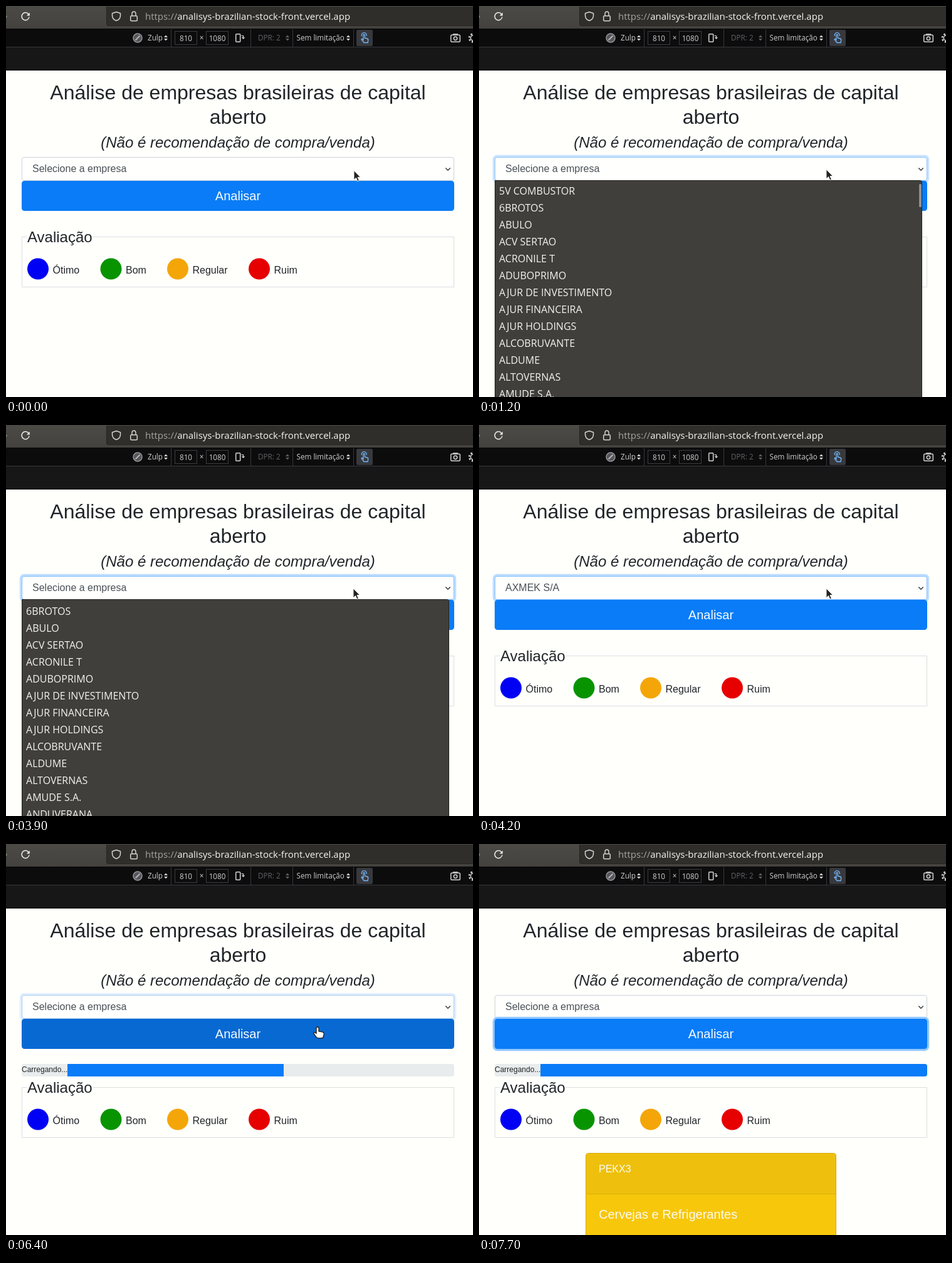
These frames come from a looping animation (745x624 px, 8 s). An HTML page:

```html
<!DOCTYPE html>
<html lang="pt">
<head>
<meta charset="utf-8">
<title>Análise de empresas</title>
<style>
html, body { margin: 0; width: 100%; height: 100%; overflow: hidden; background: #fffffc; }
svg { display: block; }
text { font-family: "Liberation Sans", Arial, sans-serif; fill: #212529; }
.ui { font-family: "Open Sans", "Noto Sans", sans-serif; }
.bar { font-size: 11.7px; fill: #cfcfd0; }
.dim { fill: #606064; }
.mid { text-anchor: middle; }
.line { fill: none; stroke: #d4d4d4; stroke-width: 1.5; }
.box { fill: none; stroke: #3c3c40; }
</style>
</head>
<body>
<svg width="745" height="624" viewBox="0 0 745 624">
  <defs>
    <linearGradient id="top" x1="0" y1="0" x2="0" y2="1">
      <stop offset="0" stop-color="#4b4a45"/><stop offset="1" stop-color="#43423e"/>
    </linearGradient>
    <clipPath id="listClip"><rect x="26" y="282" width="680" height="342"/></clipPath>
  </defs>

  <!-- browser chrome -->
  <rect width="745" height="37" fill="url(#top)"/>
  <path d="M160 1H745V32H164q-4 0-4-4z" fill="#2f2e2b"/>
  <path d="M160.500 1V28q0 3.500 3.500 3.500H745" fill="none" stroke="#252421"/>
  <path d="M0 14.500l2 2.500-2 2.500" fill="#85847f"/>
  <path d="M36 13.200A6 6 0 1 0 37 17.500" class="line" style="stroke:#eee"/>
  <path d="M37.800 10.500v5h-5z" fill="#eee"/>
  <path d="M176 9.500l6.500 2.200v3.500q0 6-6.500 8.300q-6.500-2.300-6.500-8.300v-3.500z" class="line" stroke-linejoin="round"/>
  <rect x="198.700" y="15.700" width="10.600" height="8" rx="1.500" class="line"/>
  <path d="M201 15.500v-3q0-3.500 3-3.500t3 3.500v3" class="line"/>
  <text class="ui" x="222" y="22" font-size="15" style="fill:#a5a4a0">https://<tspan fill="#f4f4f2">analisys-brazilian-stock-front.vercel.app</tspan></text>

  <!-- device toolbar -->
  <rect y="36" width="745" height="30" fill="#0c0c0d"/>
  <rect y="65" width="745" height="38" fill="#171718"/>
  <path d="M0 65.500H745M263.500 37V65M390.500 37V65M457.500 37V65M554.500 37V65" stroke="#38383d"/>
  <path d="M0 102.500H745" stroke="#101011"/>
  <circle cx="210" cy="51" r="7" fill="#55555a" stroke="#98989c" stroke-width="1.500"/>
  <path d="M206.500 54.500l7-7" stroke="#b5b5b8" stroke-width="2"/>
  <text class="ui bar" x="226" y="55">Zulp</text>
  <rect x="269.500" y="40.500" width="35" height="21" class="box"/>
  <rect x="319.500" y="40.500" width="35" height="21" class="box"/>
  <text class="ui bar mid" x="287" y="55.500">810</text>
  <text class="ui bar mid" x="312" y="55">×</text>
  <text class="ui bar mid" x="337" y="55.500">1080</text>
  <rect x="366.700" y="44.700" width="7" height="12.600" rx="1" class="line"/>
  <path d="M375.500 47.500h3v4M376.500 50l2 2.200 2-2.200" class="line" style="stroke-width:1.200"/>
  <text class="ui bar dim" x="402" y="55">DPR: 2</text>
  <text class="ui bar" x="463.500" y="55">Sem limitação</text>
  <g id="spin"></g>
  <rect x="559" y="38" width="26" height="26" rx="2" fill="#38393d"/>
  <path d="M570 54v-7q0-1.500 1.200-1.500t1.200 1.500v4l3.600 1q2 .6 1.700 2.500l-.6 4h-6l-4-5q0-1.500 1.500-1zM567.500 48a4 4 0 1 1 7.500 0" fill="none" stroke="#75b8fb" stroke-width="1.300"/>
  <rect x="709.700" y="46.200" width="14.600" height="11" rx="1.500" class="line"/>
  <path d="M713 45h8" class="line"/>
  <circle cx="717" cy="51.700" r="2.700" class="line"/>
  <circle cx="745.500" cy="51" r="4.200" class="line"/>
  <circle cx="745.500" cy="51" r="6.500" class="line" stroke-dasharray="2.500 2.600" style="stroke-width:2.500"/>

  <!-- page -->
  <text class="mid" x="370" y="149" font-size="32">Análise de empresas brasileiras de capital</text>
  <text class="mid" x="370" y="188" font-size="32">aberto</text>
  <text class="mid" x="370" y="226" font-size="24" font-style="italic">(Não é recomendação de compra/venda)</text>

  <rect id="selGlow" x="21.800" y="237.800" width="696.400" height="44.400" rx="7" fill="#bfdeff"/>
  <rect id="sel" x="25.500" y="241.500" width="689" height="37" rx="3.500" fill="#fffffd"/>
  <text id="selText" x="42" y="265" font-size="16" style="fill:#495057"></text>
  <path d="M701.300 258.500l3.700 3.700 3.700-3.700" fill="none" stroke="#343a40" stroke-width="1.500"/>

  <rect id="btnGlow" x="21.800" y="275.800" width="696.400" height="54.400" rx="7.500" fill="#92c7ff"/>
  <rect id="btn" x="25" y="279" width="690" height="48" rx="4.500"/>
  <text class="mid" x="370" y="310" font-size="20" style="fill:#f6fbff">Analisar</text>

  <g id="progress">
    <rect x="25" y="351" width="690" height="20" rx="4" fill="#e9ecec"/>
    <path id="fill" fill="#0a7cf7"/>
    <text x="25" y="364" font-size="12">Carregando...</text>
  </g>

  <g id="legend">
    <path d="M33.500 368.500H25.500V448.500H714.500V368.500H138.500" fill="none" stroke="#dcdfe0"/>
    <text x="34" y="377" font-size="24">Avaliação</text>
  </g>

  <g id="card">
    <path d="M170.500 624V497.500q0-4 4-4H565.500q4 0 4 4V624" fill="#f7c70c" stroke="#d5ab0c"/>
    <path d="M171 558V497.500q0-3.500 3.500-3.500H565.500q3.500 0 3.500 3.500V558z" fill="#eec00d"/>
    <path d="M171 558.500H569" stroke="#d9af0c"/>
    <text x="191" y="524" font-size="16" style="fill:#fbfbf4">PEKX3</text>
    <text x="191" y="598" font-size="20" style="fill:#fbfbf4">Cervejas e Refrigerantes</text>
  </g>

  <g id="popup">
    <path d="M25.500 630V278.500H703.500q3 0 3 3V630" fill="#403f3b" stroke="#232320"/>
    <g clip-path="url(#listClip)"><g id="rows"></g></g>
    <rect id="thumb" x="702" y="284" width="4" height="37" rx="1.500" fill="#91908c"/>
  </g>

  <g id="cursor">
    <path id="arrow" d="M.5 .5V15.500L4 12.200 6.400 17.700 8.900 16.600 6.500 11.300H11z" fill="#222" stroke="#f4f4f4" stroke-width="1"/>
    <path id="hand" d="M-2 2q0-2 2-2t2 2v5l5 .8q3.500 .6 3.300 3.400l-1 4.300q-.5 2.300-2.500 2.300h-6q-1.800 0-2.800-1.800l-4-5.400q-.6-2.200 1.600-2l2.400 1.600z" fill="#fff" stroke="#1c1c1c" stroke-width="1.300"/>
  </g>
</svg>
<script>
const $ = id => document.getElementById(id);
const NS = "http://www.w3.org/2000/svg";
function add(parent, tag, attrs, text) {
  const el = document.createElementNS(NS, tag);
  for (const k in attrs) el.setAttribute(k, attrs[k]);
  if (text) el.textContent = text;
  parent.appendChild(el);
}
const show = (id, on) => $(id).setAttribute("visibility", on ? "visible" : "hidden");
const clamp = v => Math.min(1, Math.max(0, v));
const ramp = (t, a, b) => clamp((t - a) / (b - a));
const smooth = v => v * v * (3 - 2 * v);
const mix = (a, b, k) => a + (b - a) * k;
const blend = (a, b, k) => `rgb(${a.map((v, i) => Math.round(mix(v, b[i], k)))})`;

// CSS "ease" timing: cubic-bezier(.25, .1, .25, 1)
function ease(x) {
  const bez = (s, p, q) => 3 * s * (1 - s) ** 2 * p + 3 * s * s * (1 - s) * q + s ** 3;
  let lo = 0, hi = 1;
  for (let i = 0; i < 24; i++) {
    const m = (lo + hi) / 2;
    if (bez(m, .25, .25) < x) lo = m; else hi = m;
  }
  return bez(lo, .1, 1);
}

const companies = ["5V COMBUSTOR", "6BROTOS", "ABULO", "ACV SERTAO", "ACRONILE T", "ADUBOPRIMO",
  "AJUR DE INVESTIMENTO", "AJUR FINANCEIRA", "AJUR HOLDINGS", "ALCOBRUVANTE", "ALDUME",
  "ALTOVERNAS", "AMUDE S.A.", "ANDUVERANA"];
companies.forEach((name, i) =>
  add($("rows"), "text", { class: "ui", x: 32, y: 301 + 27 * i, "font-size": 16, style: "fill:#f3f3f1" }, name));

const grades = [["Ótimo", 51, "#0000f5"], ["Bom", 167.5, "#089400"], ["Regular", 274, "#f4a608"], ["Ruim", 404, "#e60000"]];
for (const [name, x, color] of grades) {
  add($("legend"), "circle", { cx: x, cy: 419.5, r: 17, fill: color });
  add($("legend"), "text", { x: x + 23.5, y: 427, "font-size": 16 }, name);
}

for (const [x, color] of [[255, "#cfcfd0"], [449, "#606064"], [546, "#cfcfd0"]])
  add($("spin"), "path", { d: `M${x - 3} 50l3-3.500 3 3.500zM${x - 3} 52l3 3.500 3-3.500z`, fill: color });

// time, tip x, tip y
const path = [[0, 554.5, 262], [200, 554.5, 262], [300, 554, 261.3], [500, 554, 261.3], [600, 553.5, 260.3],
  [4900, 553.5, 260.3], [5400, 497, 292], [6900, 497, 292], [7000, 610, 300], [7100, 708.5, 265], [8000, 708.5, 265]];
function cursorAt(t) {
  let i = 1;
  while (path[i][0] < t) i++;
  const [a, b] = [path[i - 1], path[i]];
  const k = smooth(ramp(t, a[0], b[0]));
  return [mix(a[1], b[1], k), mix(a[2], b[2], k)];
}

const LOOP = 8000, STEP = 100;
function draw(ms) {
  // the screen is refreshed ten times a second
  const t = Math.floor((ms % LOOP) / STEP) * STEP;

  const focus = ramp(t, 1050, 1230) * (1 - ramp(t, 6290, 6500));
  $("selGlow").setAttribute("opacity", focus);
  $("sel").setAttribute("stroke", blend([206, 212, 218], [128, 189, 255], focus));
  $("selText").textContent = t >= 4200 && t < 6400 ? "AXMEK S/A" : "Selecione a empresa";

  const press = ramp(t, 6250, 6400) * (1 - ramp(t, 6400, 6600));
  $("btn").setAttribute("fill", blend([10, 124, 247], [8, 105, 211], press));
  $("btnGlow").setAttribute("opacity", ramp(t, 6400, 6600));

  show("popup", t >= 1200 && t < 4200);
  const scroll = smooth(ramp(t, 2100, 2600));
  $("rows").setAttribute("transform", `translate(0 ${-25 * scroll})`);
  $("thumb").setAttribute("y", 284 + scroll);
  $("thumb").setAttribute("opacity", 1 - ramp(t, 3500, 3900));

  const loading = t >= 6400;
  show("progress", loading);
  const w = Math.min(617, 345 * (1 + ease(ramp(t, 7350, 7950))));
  const r = w >= 617 ? 4 : 0;
  $("fill").setAttribute("d", `M98 351h${w - r}q${r} 0 ${r} ${r}v${20 - 2 * r}q0 ${r} ${-r} ${r}h${r - w}z`);
  $("legend").setAttribute("transform", `translate(0 ${loading ? 20 : 0})`);
  show("card", t >= 7400);

  const [x, y] = cursorAt(t);
  const on = t < 7300, arrow = y < 279;
  $("cursor").setAttribute("transform", `translate(${x} ${y})`);
  show("arrow", on && arrow);
  show("hand", on && !arrow);
}

const start = performance.now();
function tick() {
  draw(performance.now() - start);
  requestAnimationFrame(tick);
}
draw(0);
requestAnimationFrame(tick);
</script>
</body>
</html>
```
